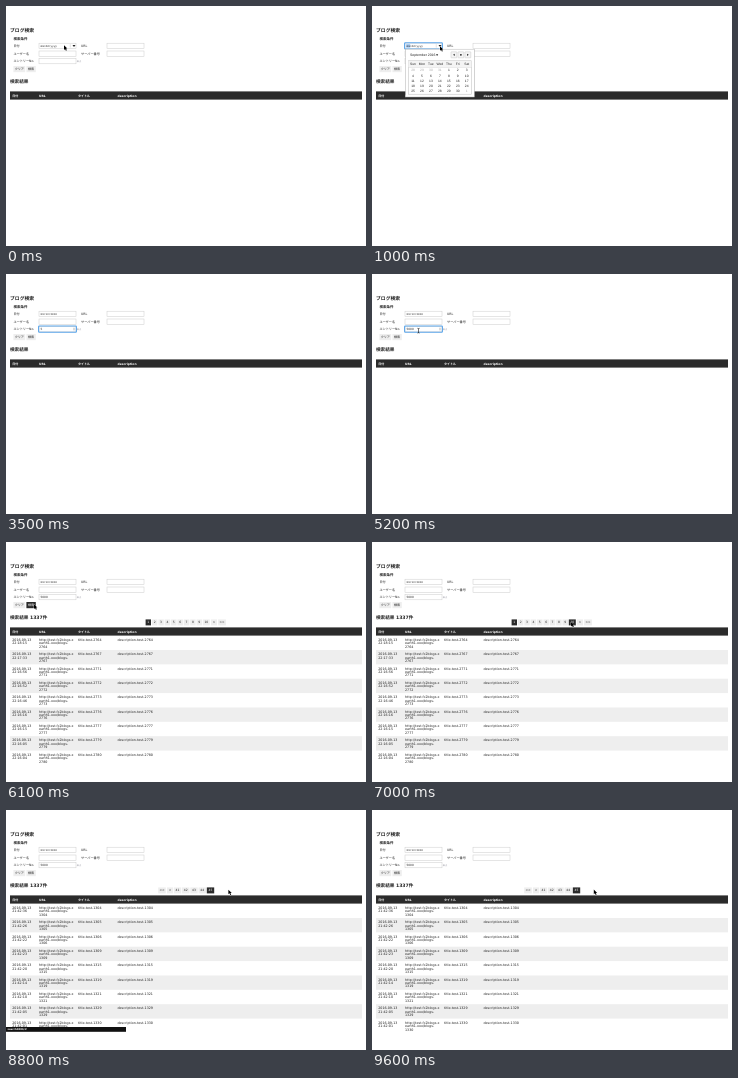
An HTML page that plays this animation: 360 by 240 pixels, repeating every 9.7 s.

```html
<!DOCTYPE html>
<html lang="ja">
<head>
<meta charset="utf-8">
<title>ブログ検索</title>
<style>
html, body { margin: 0; width: 100%; height: 100%; overflow: hidden; background: #fff; }
svg { display: block; width: 360px; height: 240px; }
text {
  font-family: "DejaVu Sans", "Noto Sans CJK JP", "Noto Sans CJK", sans-serif;
  text-rendering: geometricPrecision;
  white-space: pre;
}
.mono { font-family: "Liberation Mono", "DejaVu Sans Mono", monospace; }
.ui { font-family: "Liberation Sans", sans-serif; }
</style>
</head>
<body>
<svg id="stage" viewBox="0 0 360 240"></svg>
<script>
const stage = document.getElementById("stage");
const LOOP = 9700, STEP = 100;
const INK = "#222", DARK = "#2b2b2b", PALE = "#eee", BLUE = "#5ba5ea";

// Moments at which the state of the page changes
const AT = {
  calendar: 700, picked: 2300, entry: 2600, typing: 3400,
  keys: [3500, 4100, 4300, 4600],
  search: 5800, results: 6100, status: 7300, lastPage: 8400, fade: 9100
};

// Pointer path: time, x, y
const PATH = [
  [0, 58, 39.3], [500, 67.5, 39.3], [1000, 68, 40.2], [1300, 84, 62],
  [1600, 66, 68], [1850, 44, 72], [2100, 58.6, 73.3], [2300, 58.6, 73.3],
  [2600, 52, 55], [2900, 79.5, 46.5], [5200, 46.5, 56.7], [5700, 27, 62.4],
  [6100, 28, 62.3], [6600, 120, 68], [7000, 199, 80], [7600, 207.5, 80.8],
  [7900, 215, 80.5], [8400, 217, 80.2], [8900, 223, 79.6], [9100, 221.8, 79.6],
  [9700, 221.8, 79.6]
];

const PAGES = {
  first: {
    ids: [2764, 2767, 2771, 2772, 2773, 2776, 2777, 2779, 2780],
    times: "22:18:15 22:17:33 22:16:56 22:16:52 22:16:46 22:16:16 22:16:15 22:16:05 22:16:04",
    current: "1",
    pager: [..."123456789"].map((n, i) => [n, 142.3 + i * 6.37, 5.4])
      .concat([["10", 200.3, 7], [">", 208, 6], [">>", 216, 7.8]])
  },
  last: {
    ids: [1304, 1305, 1306, 1309, 1315, 1319, 1321, 1329, 1330],
    times: "21:42:36 21:42:26 21:42:22 21:42:23 21:42:20 21:42:14 21:42:10 21:42:05 21:42:01",
    current: "45",
    pager: [["<<", 156, 7.6], ["<", 164, 6]]
      .concat([41, 42, 43, 44, 45].map((n, i) => [String(n), 171.5 + i * 8.25, 7.4]))
  }
};

const escapeText = s => String(s).replace(/&/g, "&amp;").replace(/</g, "&lt;").replace(/>/g, "&gt;");

// y is the vertical middle of the line
const text = (s, x, y, size, fill = INK, extra = "") =>
  `<text x="${x}" y="${y + size * 0.36}" font-size="${size}" fill="${fill}" ${extra}>${escapeText(s)}</text>`;

const rect = (x, y, w, h, fill, extra = "") =>
  `<rect x="${x}" y="${y}" width="${w}" height="${h}" fill="${fill}" ${extra}/>`;

const shape = (d, fill, extra = "") => `<path d="${d}" fill="${fill}" ${extra}/>`;

const BOLD = 'font-weight="bold"', MID = 'text-anchor="middle"';

const inside = (p, x, y, w, h) =>
  p && p.x >= x && p.x <= x + w && p.y >= y && p.y <= y + h;

function pointer(t) {
  if (t >= AT.typing && t < 5200) return null;
  const i = Math.max(1, PATH.findIndex(k => k[0] > t));
  const [t0, x0, y0] = PATH[i - 1], [t1, x1, y1] = PATH[i];
  const u = (t - t0) / (t1 - t0), e = u * u * (3 - 2 * u);
  return { x: x0 + (x1 - x0) * e, y: y0 + (y1 - y0) * e };
}

function field(x, y, focused) {
  const ring = focused
    ? rect(x - 0.4, y - 0.4, 37.8, 6.2, "none", `stroke="${BLUE}" stroke-width="1.1" rx=".7"`) : "";
  return rect(x, y, 37, 5.4, "#fff", 'stroke="#ccc" stroke-width=".5"') + ring;
}

function button(label, x, w, p) {
  const hot = inside(p, x, 60, w, 6.2);
  return rect(x, 60, w, 6.2, hot ? DARK : PALE) +
    text(label, x + w / 2, 63.1, 3.1, hot ? "#fff" : INK, MID);
}

function form(t, p) {
  const open = t >= AT.calendar && t < AT.picked;
  const focus = t >= AT.entry && t < AT.search;
  const typed = "5000".slice(0, AT.keys.filter(k => t >= k).length);
  let s = text("ブログ検索", 4, 24, 4.85, INK, BOLD) + text("検索条件", 7.4, 32.7, 3.5, INK, BOLD);

  for (const [label, x, y] of [["日付", 7.4, 39.7], ["URL", 75, 39.7], ["ユーザー名", 7.4, 47.5],
    ["サーバー番号", 75, 47.5], ["エントリーNo.", 7.4, 55]]) s += text(label, x, y, 3.15);

  s += field(33, 37.2, open) + field(101, 37.2) + field(33, 45) + field(101, 45) + field(33, 52.4, focus);

  if (open) s += rect(34.2, 38, 4, 3.8, "#a9cdf5");
  s += text(t < AT.picked ? "mm/dd/yyyy" : "09/13/2016", 34.5, 40, 2.75, INK, 'class="mono"');
  if (open || inside(p, 33, 37, 37, 6)) {
    s += rect(63.9, 38.2, 0.4, 3.4, "#bbb") + shape("M66.5 39.1h3l-1.5 2z", INK);
  }
  s += text(typed, 34.4, 55.1, 2.9);
  if (focus) s += shape("M67.2 54.6l.8-1l.8 1zM67.2 55.6l.8 1l.8-1z", "#888");
  s += text("以上", 70.8, 55.6, 2.2, "#667");
  return s + button("クリア", 7.4, 11.8, p) + button("検索", 20.4, 9.4, p);
}

function pager(page, p) {
  return page.pager.map(([label, cx, w]) => {
    const dark = label === page.current || inside(p, cx - w / 2, 77.4, w, 6);
    return rect(cx - w / 2, 77.4, w, 6, dark ? DARK : PALE) +
      text(label, cx, 80.4, 3, dark ? "#fff" : INK, MID);
  }).join("");
}

function table(page) {
  let s = rect(4, 85.4, 352, 8.2, DARK);
  for (const [label, x] of [["日付", 6.3], ["URL", 33], ["タイトル", 72], ["description", 111.5]])
    s += text(label, x, 89.5, 3, "#fff", BOLD);
  if (!page) return s;

  const times = page.times.split(" ");
  page.ids.forEach((id, i) => {
    const top = 93.6 + i * 14.37;
    const cell = (x, ...lines) =>
      lines.forEach((line, n) => { s += text(line, x, top + 4 + n * 3.4, 3.3); });
    if (i % 2) s += rect(4, top, 352, 14.37, PALE);
    cell(6.2, "2016-09-13", times[i]);
    cell(33, "http://test.fc2blogs.x", "earth1.ooo/blogs-", id);
    cell(72, "title-test-" + id);
    cell(111.5, "description-test-" + id);
  });
  return s;
}

function calendar(p) {
  const ui = 'class="ui"', col = i => 41 + i * 8.95, row = i => 64.2 + i * 5.2;
  let s = rect(33.2, 43.2, 69.8, 48.6, "#000", 'opacity=".12"') +
    rect(33.5, 43.2, 68.8, 47.8, "#fff", 'stroke="#bbb" stroke-width=".5"') +
    text("September 2016", 38, 49, 3.45, INK, ui) + shape("M64 48.3h2.2l-1.1 1.6z", INK);

  for (const x of [79, 86, 93])
    s += rect(x, 45.8, 5.8, 6, "#f5f5f5", 'stroke="#bbb" stroke-width=".4" rx=".5"');
  s += shape("M82.7 47.7v2.2l-1.6-1.1zM95.1 47.7v2.2l1.6-1.1z", INK) +
    '<circle cx="88.9" cy="48.8" r=".9" fill="#222"/>';

  s += rect(36.3, 54.8, 63.2, 33.4, "#fff", 'stroke="#bbb" stroke-width=".5"') +
    rect(36.5, 55, 62.8, 6.1, "#f4f4f4") + rect(36.3, 61.1, 63.2, 0.4, "#ccc");
  "Sun Mon Tue Wed Thu Fri Sat".split(" ").forEach((d, i) => {
    s += text(d, col(i), 58.3, 3.3, INK, ui + " " + MID);
  });

  for (let n = 0; n < 35; n++) {
    const x = col(n % 7), y = row(Math.floor(n / 7));
    const day = n - 3, other = day < 1 || day > 30;
    if (inside(p, x - 4.47, y - 2.6, 8.94, 5.19)) s += rect(x - 4.4, y - 2.6, 8.8, 5.2, "#bcd6f5");
    s += text(day < 1 ? day + 31 : day > 30 ? day - 30 : day, x, y, 3.3,
      other ? "#aaa" : INK, ui + " " + MID);
  }
  return s;
}

function statusBar(t) {
  const alpha = Math.min(1, Math.max(0, 1 - (t - AT.fade + STEP) / 600));
  return `<g opacity="${alpha}">` + rect(0, 217, 120, 4.8, "#111") +
    text("search0086/#", 1.4, 219.4, 2.5, "#fff", BOLD) + "</g>";
}

function cursor(p) {
  const overText = inside(p, 33, 52, 34, 6);
  const art = overText
    ? shape("M-1 -2.4Q0 -2.4 0 -1.7Q0 -2.4 1 -2.4M0 -1.8V1.8M-1 2.4Q0 2.4 0 1.7Q0 2.4 1 2.4",
      "none", 'stroke="#111" stroke-width=".6"')
    : shape("M0 0V4.6L1.1 3.6L1.9 5.4L2.8 5L2 3.3H3.4Z", "#000",
      'stroke="#fff" stroke-width=".5" paint-order="stroke"');
  return `<g transform="translate(${p.x} ${p.y})">${art}</g>`;
}

function draw(t) {
  const p = pointer(t);
  const page = t < AT.results ? null : t < AT.lastPage ? PAGES.first : PAGES.last;
  let s = form(t, p) + text(page ? "検索結果 1337件" : "検索結果", 4, 75, 4.6, INK, BOLD) + table(page);
  if (page) s += pager(page, p) + rect(0, 222, 360, 18, "#fff");
  if (t >= AT.calendar && t < AT.picked) s += calendar(p);
  if (t >= AT.status) s += statusBar(t);
  if (p) s += cursor(p);
  stage.innerHTML = s;
}

const start = performance.now();
let shown = -1;
function tick() {
  const t = Math.floor(((performance.now() - start) % LOOP) / STEP) * STEP;
  if (t !== shown) draw(shown = t);
  requestAnimationFrame(tick);
}
tick();
</script>
</body>
</html>
```
